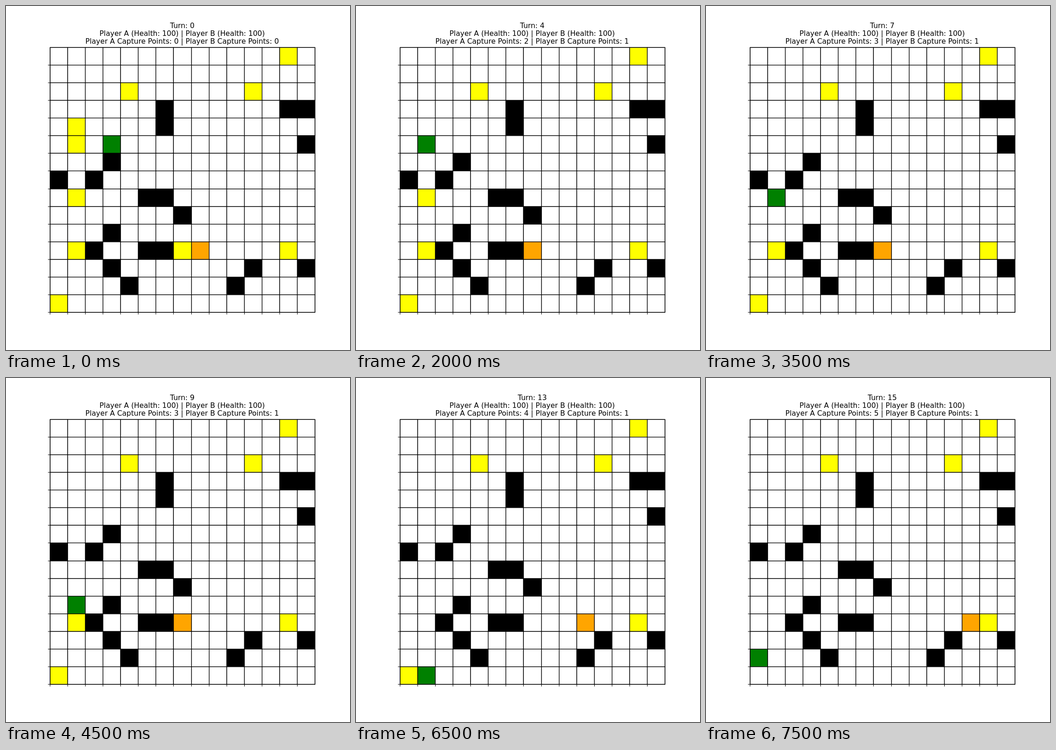
These frames come from a looping animation (748 by 748 pixels, 8 s). An HTML page with a canvas:

```html
<!DOCTYPE html>
<html lang="en">
<head>
<meta charset="utf-8">
<title>Capture grid</title>
<style>
html, body { margin: 0; width: 100%; height: 100%; overflow: hidden; background: #fff; }
canvas { display: block; }
</style>
</head>
<body>
<canvas id="stage" width="748" height="748"></canvas>
<script>
const ctx = document.getElementById("stage").getContext("2d");
const TURN_MS = 500, TURNS = 16, N = 15;
const SCALE = 0.935; // layout is in 800 units
const LEFT = 102, TOP = 96, SIDE = 616;

// # wall, y capture point
const MAP = [
  ".............y.",
  "...............",
  "....y......y...",
  "......#......##",
  ".y....#........",
  ".y............#",
  "...#...........",
  "#.#............",
  ".y...##........",
  ".......#.......",
  "...#...........",
  ".y#..##y.....y.",
  "...#.......#..#",
  "....#.....#....",
  "y.............."
];
const COLORS = { ".": "#fff", "#": "#000", y: "#ff0", A: "#008000", B: "#ffa500" };
const STEPS = { L: [-1, 0], R: [1, 0], U: [0, -1], D: [0, 1], "-": [0, 0] };
const PLAYERS = [
  { id: "A", start: [3, 5], moves: "LLUDDDDDDDDDDLU" },
  { id: "B", start: [8, 11], moves: "L---------RRRRR" }
];

const edge = (origin, i) => Math.round(origin + i * SIDE / N) + 0.5;

// Replays the game up to the given turn
function play(turn) {
  const grid = MAP.map(row => [...row]);
  const players = PLAYERS.map(p => ({ ...p, x: p.start[0], y: p.start[1], score: 0 }));
  for (let t = 0; t < turn; t++) {
    for (const p of players) {
      const [dx, dy] = STEPS[p.moves[t]];
      p.x += dx;
      p.y += dy;
      if (grid[p.y][p.x] === "y") {
        p.score++;
        grid[p.y][p.x] = ".";
      }
    }
  }
  for (const p of players) grid[p.y][p.x] = p.id;
  return { grid, scores: players.map(p => p.score) };
}

function line(x1, y1, x2, y2) {
  ctx.beginPath();
  ctx.moveTo(x1, y1);
  ctx.lineTo(x2, y2);
  ctx.stroke();
}

function drawGrid(grid) {
  ctx.lineWidth = 1.39;
  grid.forEach((row, r) => row.forEach((cell, c) => {
    const x = edge(LEFT, c), y = edge(TOP, r);
    const box = [x, y, edge(LEFT, c + 1) - x, edge(TOP, r + 1) - y];
    ctx.fillStyle = COLORS[cell];
    ctx.fillRect(...box);
    ctx.strokeRect(...box);
  }));
}

function drawAxes() {
  const x0 = edge(LEFT, 0), y1 = edge(TOP, N);
  ctx.lineWidth = 1.11;
  ctx.strokeRect(x0, edge(TOP, 0), SIDE, SIDE);
  for (let i = 0; i < N; i++) {
    const x = edge(LEFT, i), y = edge(TOP, i + 1);
    line(x, y1, x, y1 + 4.86);
    line(x0 - 4.86, y, x0, y);
  }
}

function drawTitle(turn, [a, b]) {
  ctx.fillStyle = "#000";
  ctx.font = '16.667px "DejaVu Sans", sans-serif';
  ctx.textAlign = "center";
  ctx.fillText(`Turn: ${turn}`, 410, 51.7);
  ctx.fillText("Player A (Health: 100) | Player B (Health: 100)", 409.6, 69.4);
  ctx.fillText(`Player A Capture Points: ${a} | Player B Capture Points: ${b}`, 409.6, 88);
}

function draw(turn) {
  const { grid, scores } = play(turn);
  ctx.setTransform(1, 0, 0, 1, 0, 0);
  ctx.fillStyle = "#fff";
  ctx.fillRect(0, 0, 748, 748);
  ctx.scale(SCALE, SCALE);
  ctx.strokeStyle = "#000";
  drawGrid(grid);
  drawAxes();
  drawTitle(turn, scores);
}

const begin = performance.now();
function tick() {
  const elapsed = Math.max(0, performance.now() - begin);
  draw(Math.floor(elapsed / TURN_MS) % TURNS);
  requestAnimationFrame(tick);
}
tick();
</script>
</body>
</html>
```
